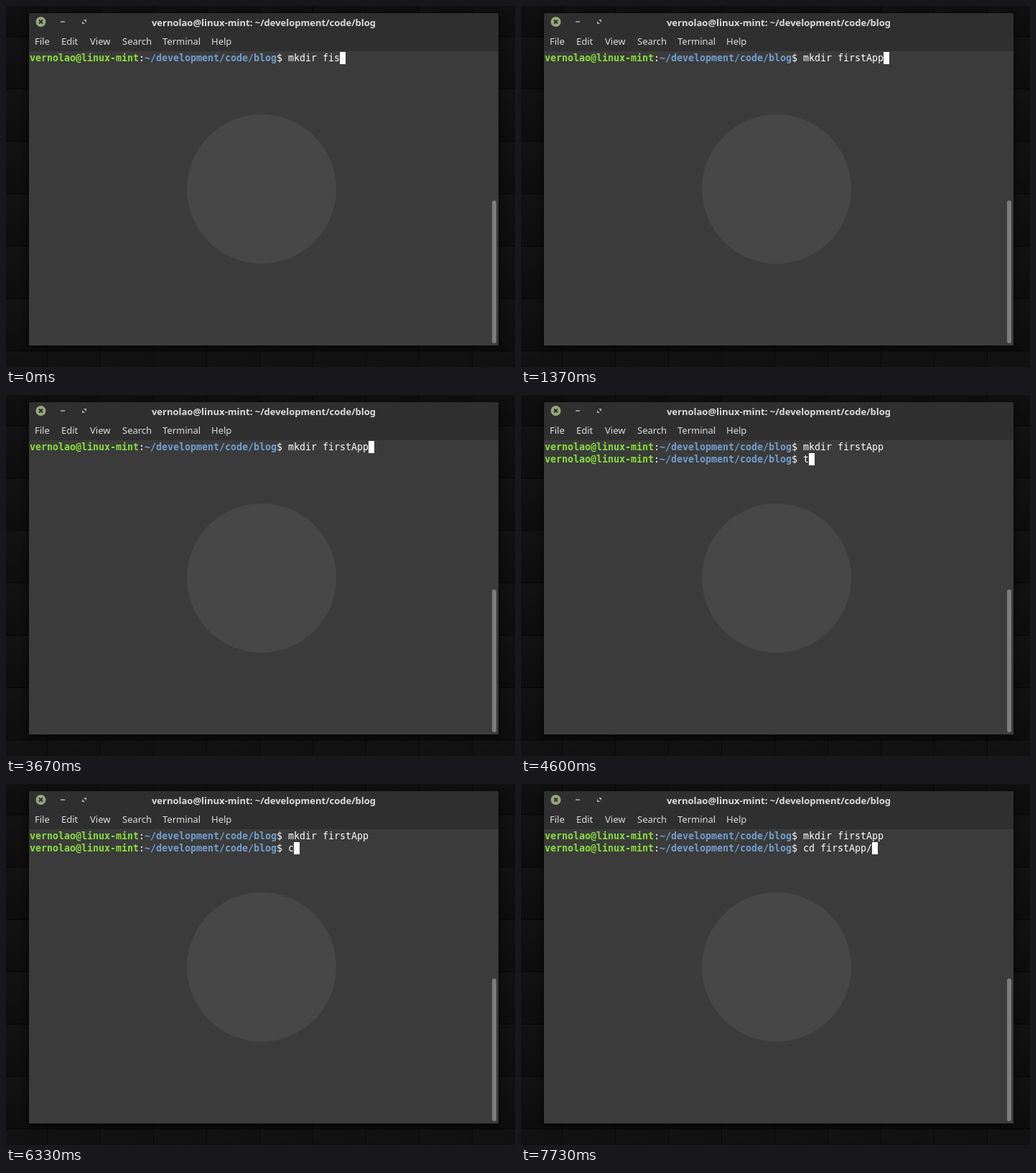
An HTML page for the animation above (8000 ms loop, 709x503 px).

```html
<!DOCTYPE html>
<html lang="en">
<head>
<meta charset="utf-8">
<title>Terminal</title>
<style>
  html, body { margin: 0; width: 100%; height: 100%; overflow: hidden; background: #0e0e0e; }
  svg { display: block; }
  text { white-space: pre; }
  .ui { font: 13px "Noto Sans", sans-serif; fill: #dcdcdc; }
  .title { font-weight: 600; }
  .term { font: 13.29px "DejaVu Sans Mono", monospace; fill: #fff; }
  .user { font-weight: bold; fill: #8ae234; }
  .path { font-weight: bold; fill: #729fcf; }
</style>
</head>
<body>
<svg width="709" height="503" viewBox="0 0 709 503">
  <defs>
    <linearGradient id="shade" x2="0.3" y2="1">
      <stop stop-color="#131313"/><stop offset="1" stop-color="#0d0d0d"/>
    </linearGradient>
    <pattern id="tiles" x="57" y="42" width="74" height="73" patternUnits="userSpaceOnUse">
      <rect width="74" height="73" fill="url(#shade)"/>
      <path d="M0 73V.5H74" fill="none" stroke="#060606" stroke-width="1.5"/>
    </pattern>
    <filter id="blur" x="-10%" y="-10%" width="120%" height="120%"><feGaussianBlur stdDeviation="5"/></filter>
    <g id="prompt">
      <text class="term user" x="33">vernolao@linux-mint</text>
      <text class="term" x="185">:</text>
      <text class="term path" x="193">~/development/code/blog</text>
      <text class="term" x="377">$</text>
    </g>
  </defs>

  <rect width="709" height="503" fill="url(#tiles)"/>
  <rect x="31" y="12" width="656" height="464" opacity=".6" filter="url(#blur)"/>
  <path d="M32 473V13q0-3 3-3H683q3 0 3 3V473Z" fill="#3b3b3b"/>
  <path d="M32 63V13q0-3 3-3H683q3 0 3 3V63Z" fill="#2f2f2f"/>
  <circle cx="356" cy="255" r="104" fill="#474747"/>
  <rect x="677" y="271" width="6" height="199" rx="3" fill="#7c7c7c"/>

  <circle cx="48.5" cy="22" r="7" fill="#96a87c"/>
  <path d="M46 19.5l5 5m0-5l-5 5" stroke="#2b2b2b" stroke-width="1.8"/>
  <path d="M76 22h6" stroke="#aaa" stroke-width="1.6"/>
  <path d="M108 19h4v4zM106 21v4h4z" fill="#aaa"/>

  <text class="ui title" x="359" y="28" text-anchor="middle">vernolao@linux-mint: ~/development/code/blog</text>
  <g id="menu"></g>

  <use href="#prompt" y="77"/>
  <use href="#prompt" y="94" id="second"/>
  <text class="term" x="393" y="77" id="line0"></text>
  <text class="term" x="393" y="94" id="line1"></text>
  <rect id="cursor" width="8" height="17" fill="#fff"/>
</svg>
<script>
const $ = id => document.getElementById(id);
const LOOP = 8000, CELL = 8, LEFT = 393, ENTER = 3700;
const FIRST = "mkdir firstApp";

const menu = { File: 40, Edit: 77, View: 117, Search: 162, Terminal: 218, Help: 286 };
$("menu").innerHTML = Object.entries(menu)
  .map(([label, x]) => `<text class="ui" x="${x}" y="54">${label}</text>`).join("");

// [time, text on the active line, cursor hidden]
const steps = [
  [0, "mkdir fis"], [200, "mkdir fir"], [330, "mkdir firs"], [470, "mkdir first"],
  [1100, "mkdir firstA"], [1200, "mkdir firstAp"], [1370, FIRST],
  [1930, FIRST, true], [2530, FIRST], [3130, FIRST, true], [3670, FIRST],
  [ENTER, ""], [4270, "", true],
  [4600, "t"], [4730, "to"], [4870, "tou"], [5100, "touc"], [5200, "touch"],
  [5570, "touc"], [5730, "tou"], [5830, "to"], [5930, "t"], [6070, ""],
  [6330, "c"], [6470, "cd"], [6970, "cd "], [7300, "cd f"], [7500, "cd fi"],
  [7730, "cd firstApp/"]
];

function draw(now) {
  const time = now % LOOP;
  const [, typed, hidden] = steps.findLast(([start]) => start <= time);
  const entered = time >= ENTER;
  $("second").style.display = entered ? "" : "none";
  $("line0").textContent = entered ? FIRST : typed;
  $("line1").textContent = entered ? typed : "";
  $("cursor").setAttribute("x", LEFT + typed.length * CELL);
  $("cursor").setAttribute("y", entered ? 81 : 64);
  $("cursor").style.display = hidden ? "none" : "";
  requestAnimationFrame(draw);
}
draw(0);
</script>
</body>
</html>
```
